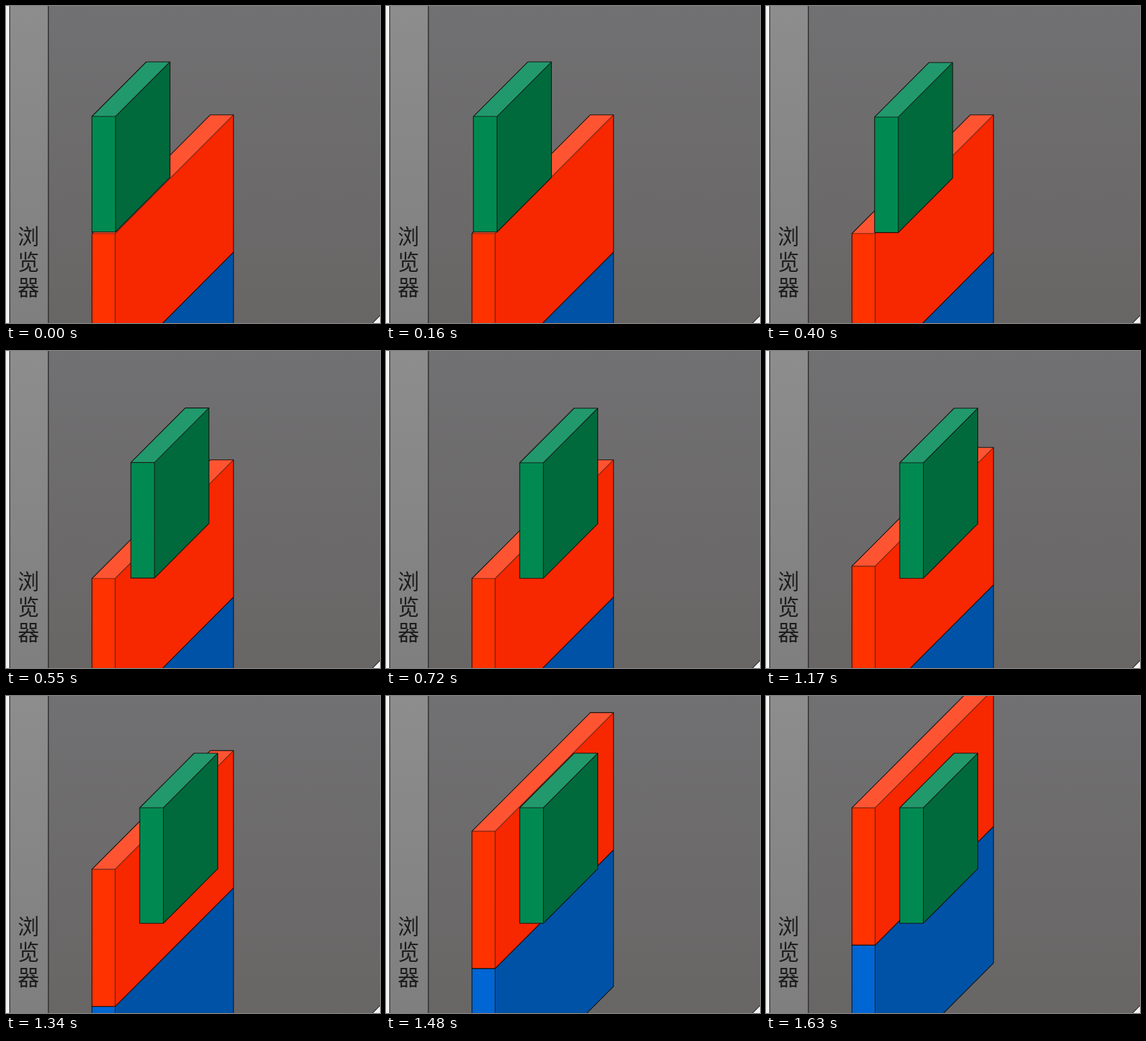
These frames come from a looping animation (557x471 px, 1.71 s). An HTML page:

```html
<!DOCTYPE html>
<html lang="zh-CN">
<head>
<meta charset="utf-8">
<title>Layers</title>
<style>
  html, body { margin: 0; width: 100%; height: 100%; overflow: hidden; background: #f3f3f3; }
  svg { display: block; width: 557px; height: 471px; }
  text { font: 32px "Noto Sans CJK SC", "Noto Sans CJK", sans-serif; fill: #1c1c1c; text-anchor: middle; }
  .frame { stroke: #2b2b2b; stroke-width: 1.2; }
  .box { stroke: #14110f; stroke-width: 1.1; stroke-linejoin: round; }
</style>
</head>
<body>
<svg viewBox="0 0 557 471">
  <defs>
    <linearGradient id="wall" x2="0" y2="1">
      <stop stop-color="#717072"/><stop offset="1" stop-color="#686665"/>
    </linearGradient>
    <linearGradient id="side" x2="0" y2="1">
      <stop stop-color="#8d8d8e"/><stop offset="1" stop-color="#7f7f7f"/>
    </linearGradient>
  </defs>
  <path class="frame" fill="url(#wall)" d="M63 -3H560V457L543 474H63Z"/>
  <path class="frame" fill="url(#side)" d="M5.5 -3H63V474H5.5Z"/>
  <text x="33.5" y="354">浏</text>
  <text x="33.5" y="392">览</text>
  <text x="33.5" y="430">器</text>
  <g id="stack"></g>
  <g id="tile"></g>
</svg>
<script>
  const LOOP = 1710;
  const STEPS = [0, 80, 160, 230, 310, 400, 470, 550, 630, 720, 780,
                 860, 940, 1020, 1090, 1170, 1250, 1340, 1400, 1480, 1560, 1630];
  const stack = document.getElementById('stack');
  const tile = document.getElementById('tile');

  function add(parent, name, attrs) {
    const el = document.createElementNS('http://www.w3.org/2000/svg', name);
    for (const key in attrs) el.setAttribute(key, attrs[key]);
    parent.append(el);
  }

  // Oblique box: x, y is the near top-left corner, depth runs up and right.
  function box(parent, { x, y, w, h, depth, colors, inner }) {
    const [front, side, top] = colors;
    const face = (d, fill) => add(parent, 'path', { class: 'box', d, fill, stroke: 'none', style: 'stroke:none' });
    const rx = x + w, d = depth;
    face(`M${x} ${y}h${w}v${h}h${-w}z`, front);
    face(`M${rx} ${y}l${d} ${-d}v${h}l${-d} ${d}z`, side);
    face(`M${x} ${y}h${w}l${d} ${-d}h${-w}z`, top);
    add(parent, 'path', {
      class: 'box', fill: 'none', 'stroke-opacity': inner,
      d: `M${x} ${y}h${w}v${h}M${rx} ${y}l${d} ${-d}`
    });
    add(parent, 'path', {
      class: 'box', fill: 'none',
      d: `M${x} ${y}l${d} ${-d}h${w}v${h}l${-d} ${d}h${-w}z`
    });
  }

  const slab = { x: 128, w: 34.5, h: 204, depth: 176.3 };
  box(stack, { ...slab, y: 542, h: 203, inner: 0.75, colors: ['#0066d4', '#0052a7', '#2b7fe0'] });
  box(stack, { ...slab, y: 338, inner: 0.6, colors: ['#ff3200', '#f72700', '#ff5432'] });
  box(tile, { x: 128, y: 164, w: 35.2, h: 171.7, depth: 81, inner: 0.85,
              colors: ['#008a51', '#006a3c', '#21996d'] });

  function ease(t, start, length) {
    const p = Math.min(1, Math.max(0, (t - start) / length));
    return (1 - Math.cos(Math.PI * p)) / 2;
  }

  function draw(now) {
    const time = now % LOOP;
    const t = STEPS.findLast(s => s <= time);
    const slide = ease(t, 88, 645);
    const lift = ease(t, 1035, 640);
    tile.setAttribute('transform', `translate(${71.2 * slide} ${2 * slide})`);
    stack.setAttribute('transform', `translate(0 ${-174 * lift})`);
  }

  let begin;
  function tick(now) {
    begin ??= now;
    draw(Math.max(0, now - begin));
    requestAnimationFrame(tick);
  }
  draw(0);
  requestAnimationFrame(tick);
</script>
</body>
</html>
```
